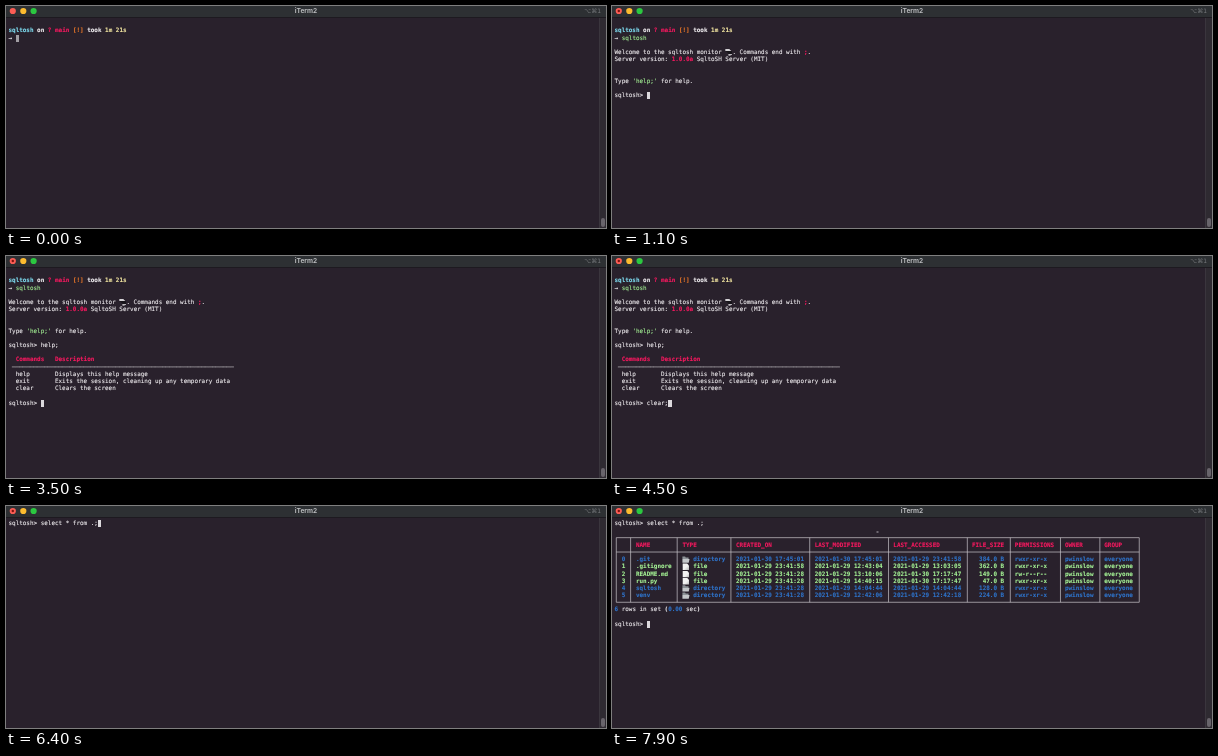
An HTML page that plays this animation: 600x222 px, repeating every 8 s.

```html
<!DOCTYPE html>
<html lang="en">
<head>
<meta charset="utf-8">
<title>Terminal session</title>
<style>
  html, body { margin: 0; width: 100%; height: 100%; overflow: hidden; background: #29212c; }
  #stage { position: relative; width: 600px; height: 222px; overflow: hidden; background: #29212c; }
  #bar { position: absolute; inset: 0 0 auto; height: 12px; background: #2d3033; border-bottom: 1px solid #1d1a20;
    box-sizing: border-box; font: bold 6.6px/11px Inter, sans-serif; color: #b9bbbd; text-align: center; }
  #bar small { position: absolute; right: 5px; top: 0; font: 6px/10px "DejaVu Sans", sans-serif; color: #74777a; }
  #track { position: absolute; right: 0; top: 12px; width: 7px; height: 210px; background: #2e2a31;
    border-left: 1px solid #3a353d; box-sizing: border-box; }
  #track::after { content: ""; position: absolute; left: 1px; bottom: 1px; width: 4px; height: 9px;
    border-radius: 2px; background: #68646b; }
  svg { position: absolute; left: 0; top: 0; }
  pre { position: absolute; left: 2.5px; top: 14.2px; margin: 0; color: #f2eff2;
    font: 5.95px/7.18px "DejaVu Sans Mono", monospace; text-rendering: geometricPrecision;
    font-variant-ligatures: none; -webkit-text-stroke: .1px; }
  .pink { color: #f5195f; } .cyan { color: #7edcf0; } .orange { color: #f07a28; }
  .yellow { color: #f0e3a0; } .green { color: #a4f295; } .blue { color: #2f73c9; }
  .cursor { background: #dcd9dd; }
  .dim { background: #a19da3; }
  .rule { position: relative; top: .6px; }
  i { display: inline-block; width: 2ch; height: 7px; vertical-align: top; }
  .folder { background: linear-gradient(#8d9297 45%, #c3c6c9 45%);
    clip-path: polygon(0 6%, 38% 6%, 46% 20%, 86% 20%, 86% 42%, 100% 42%, 88% 96%, 0 96%); }
  .page { background: linear-gradient(135deg, #f2f2f2 55%, #a9a9a9);
    clip-path: polygon(4% 2%, 66% 2%, 92% 32%, 92% 98%, 4% 98%); }
  .gadget { background: linear-gradient(#d5d2d6 22%, #17141a 22% 70%, #bdb9be 70%);
    clip-path: polygon(0 0, 55% 0, 98% 45%, 98% 78%, 65% 96%, 45% 96%, 40% 60%, 0 30%); }
</style>
</head>
<body>
<div id="stage">
  <div id="bar">iTerm2<small>⌥⌘1</small></div>
  <div id="track"></div>
  <svg width="600" height="222">
    <circle cx="6.8" cy="5" r="3.1" fill="#fb5d55"/>
    <circle cx="17.3" cy="5" r="3.1" fill="#fcbb2f"/>
    <circle cx="27.6" cy="5" r="3.1" fill="#2bc840"/>
    <circle id="busy" cx="6.8" cy="5" r="1.2" fill="#7c120f"/>
    <g id="grid"><path fill="none" stroke="#c9c4ca" stroke-width=".7"/>
      <rect x="264.5" y="25.5" width="2" height="1" fill="#b5b0b6"/></g>
  </svg>
  <pre id="term"></pre>
</div>
<script>
const $ = id => document.getElementById(id);
const LOOP = 8000, CHAR = 3.582, LEFT = 2.5, ROW = 7.18, TOP = 17.3;

const ink = (color, text) => `<span class="${color}">${text}</span>`;
const bold = (color, text) => `<b class="${color}">${text}</b>`;
const cursor = kind => ink(kind || 'cursor', ' ');
const PROMPT = 'sqltosh&gt; ';

// Each typing script lists [time, number of characters shown].
const typed = (text, steps, t) => {
  let n = 0;
  for (const [at, count] of steps) if (t >= at) n = count;
  return text.slice(0, n);
};
const START = [[200, 1], [300, 2], [400, 3], [500, 4], [600, 6], [700, 7]];
const HELP = [[2200, 1], [2300, 2], [2400, 3], [2500, 4], [2600, 5]];
const CLEAR = [[3800, 1], [3900, 3], [4000, 5], [4400, 6]];
const SELECT = [[4800, 1], [4900, 2], [5000, 3], [5100, 4], [5200, 5], [5300, 6], [5400, 7],
  [5500, 9], [5600, 10], [5700, 12], [5800, 14], [6300, 15], [6400, 16]];

const shell = ['', bold('cyan', 'sqltosh') + ' <b>on</b> ' + bold('pink', '? main') + ' ' +
  bold('orange', '[!]') + ' <b>took</b> ' + bold('yellow', '1m 21s')];

const welcome = ['',
  `Welcome to the sqltosh monitor <i class="gadget"></i>. Commands end with ${bold('pink', ';')}.`,
  `Server version: ${bold('pink', '1.0.0a')} SqltoSH Server (MIT)`,
  '', '',
  `Type ${ink('green', "'help;'")} for help.`, ''];

const helpText = ['',
  bold('pink', '  Commands   Description'),
  ' ' + ink('rule', '─'.repeat(62)),
  '  help       Displays this help message',
  '  exit       Exits the session, cleaning up any temporary data',
  '  clear      Clears the screen', ''];

const edges = [0, 4, 17, 32, 54, 76, 98, 110, 124, 135, 146];
const heads = ['', 'NAME', 'TYPE', 'CREATED_ON', 'LAST_MODIFIED', 'LAST_ACCESSED',
  'FILE_SIZE', 'PERMISSIONS', 'OWNER', 'GROUP'];
const files = [
  ['.git', 'directory', '30 17:45:01', '30 17:45:01', '29 23:41:58', '384.0 B'],
  ['.gitignore', 'file', '29 23:41:58', '29 12:43:04', '29 13:03:05', '362.0 B'],
  ['README.md', 'file', '29 23:41:28', '29 13:10:06', '30 17:17:47', '149.0 B', 'rw-r--r--'],
  ['run.py', 'file', '29 23:41:28', '29 14:40:15', '30 17:17:47', '47.0 B'],
  ['sqltosh', 'directory', '29 23:41:28', '29 14:04:44', '29 14:04:44', '128.0 B'],
  ['venv', 'directory', '29 23:41:28', '29 12:42:06', '29 12:42:18', '224.0 B'],
];

const tableRow = cells => cells.map((cell, k) => {
  const width = edges[k + 1] - edges[k] - 3;
  return '  ' + (/ B$/.test(cell) ? cell.padStart(width) : cell.padEnd(width)) + ' ';
}).join('');

const fileRow = ([name, type, made, changed, read, size, mode = 'rwxr-xr-x'], k) => {
  const dates = [made, changed, read].map(d => '2021-01-' + d);
  const line = tableRow([String(k), name, '@@ ' + type, ...dates, size, mode, 'pwinslow', 'everyone']);
  const isDir = type === 'directory';
  return bold(isDir ? 'blue' : 'green', line.replace('@@', `<i class="${isDir ? 'folder' : 'page'}"></i>`));
};

const table = ['', '', bold('pink', tableRow(heads)), '', ...files.map(fileRow), '',
  `${bold('blue', '6')} rows in set <b>(</b>${bold('blue', '0.00')} sec<b>)</b>`, ''];

// Table rules run through the middle of their character cells.
const x = col => LEFT + (col + .5) * CHAR, y = row => TOP + row * ROW;
$('grid').firstElementChild.setAttribute('d',
  edges.map(c => `M${x(c)} ${y(2)}V${y(11)}`).join('') +
  [2, 4, 11].map(r => `M${x(0)} ${y(r)}H${x(146)}`).join(''));

function screen(t) {
  if (t >= 4600) {
    const query = PROMPT + typed('select * from .;', SELECT, t);
    return t < 6900 ? [query + cursor()] : [query, ...table, PROMPT + cursor()];
  }
  const command = typed('sqltosh', START, t);
  const lines = [...shell, '<b>→</b> ' + ink(command === 'sqltosh' ? 'green' : 'pink', command)];
  if (t < 900) {
    lines[2] += cursor(t < 200 && 'dim');
    return lines;
  }
  if (t < 1000) return [...lines, cursor()];
  lines.push(...welcome);
  const help = PROMPT + typed('help;', HELP, t);
  if (t < 2900) return [...lines, help + cursor()];
  return [...lines, help, ...helpText, PROMPT + typed('clear;', CLEAR, t) + cursor()];
}

let shown;
function draw(now) {
  const t = now % LOOP;
  const html = screen(t).join('\n');
  // The empty span keeps a leading blank line from being dropped.
  if (html !== shown) $('term').innerHTML = '<span></span>' + (shown = html);
  $('busy').style.display = t >= 900 ? '' : 'none';
  $('grid').style.display = t >= 6900 ? '' : 'none';
  requestAnimationFrame(draw);
}
draw(performance.now());
</script>
</body>
</html>
```
